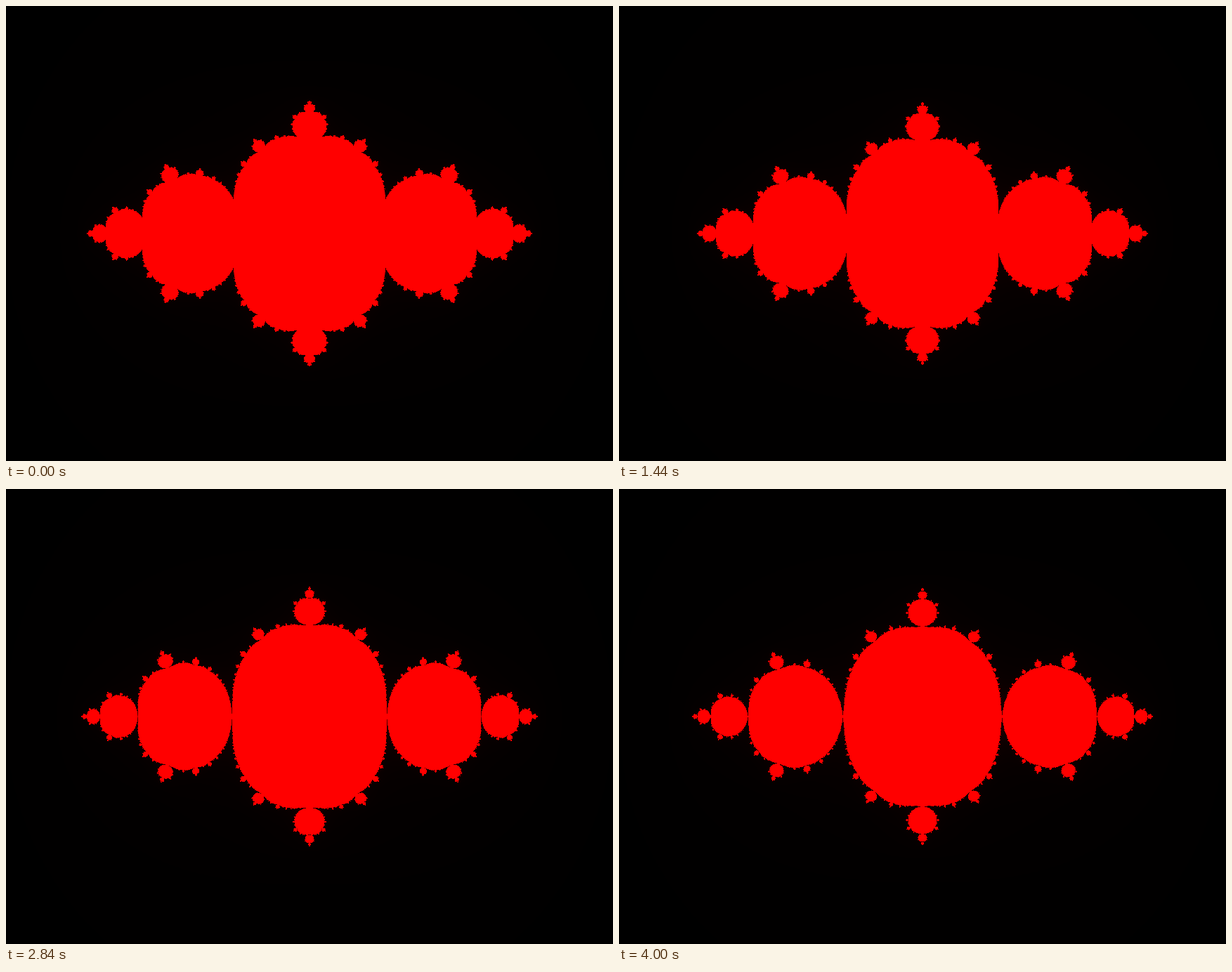
An HTML page with a canvas for the animation above (4040 ms loop, 864 by 648 pixels).

```html
<!DOCTYPE html>
<html lang="en">
<head>
<meta charset="utf-8">
<title>Julia set</title>
<style>
  html, body { margin: 0; width: 100%; height: 100%; overflow: hidden; background: #000; }
  canvas { display: block; }
</style>
</head>
<body>
<canvas id="stage" width="864" height="648"></canvas>
<script>
const W = 864, H = 648, SCALE = 216;
const STEPS = 101, STEP_MS = 40, MAX_ITER = 255;

const ctx = document.getElementById('stage').getContext('2d');
const image = ctx.createImageData(W, H);
const pixels = new Uint32Array(image.data.buffer);

// Iterations of z² + c (c real) before |z| exceeds 2
function escapeTime(x, y, c) {
  let n = 0, xx = x * x, yy = y * y;
  while (n < MAX_ITER && xx + yy <= 4) {
    y = 2 * x * y;
    x = xx - yy + c;
    xx = x * x;
    yy = y * y;
    n++;
  }
  return n;
}

// The set is symmetric in both axes, so one quadrant gives all four
function draw(step) {
  const c = -0.7 - step * 0.001;
  for (let j = 0; j < H / 2; j++) {
    const top = (H / 2 - 1 - j) * W, bottom = (H / 2 + j) * W;
    for (let i = 0; i < W / 2; i++) {
      const left = W / 2 - 1 - i, right = W / 2 + i;
      const red = escapeTime((i + 0.5) / SCALE, (j + 0.5) / SCALE, c);
      pixels[top + left] = pixels[top + right] =
        pixels[bottom + left] = pixels[bottom + right] = 0xff000000 | red;
    }
  }
  ctx.putImageData(image, 0, 0);
}

let shown = -1;
function tick() {
  const step = Math.floor(performance.now() / STEP_MS) % STEPS;
  if (step !== shown) draw(shown = step);
  requestAnimationFrame(tick);
}
tick();
</script>
</body>
</html>
```
